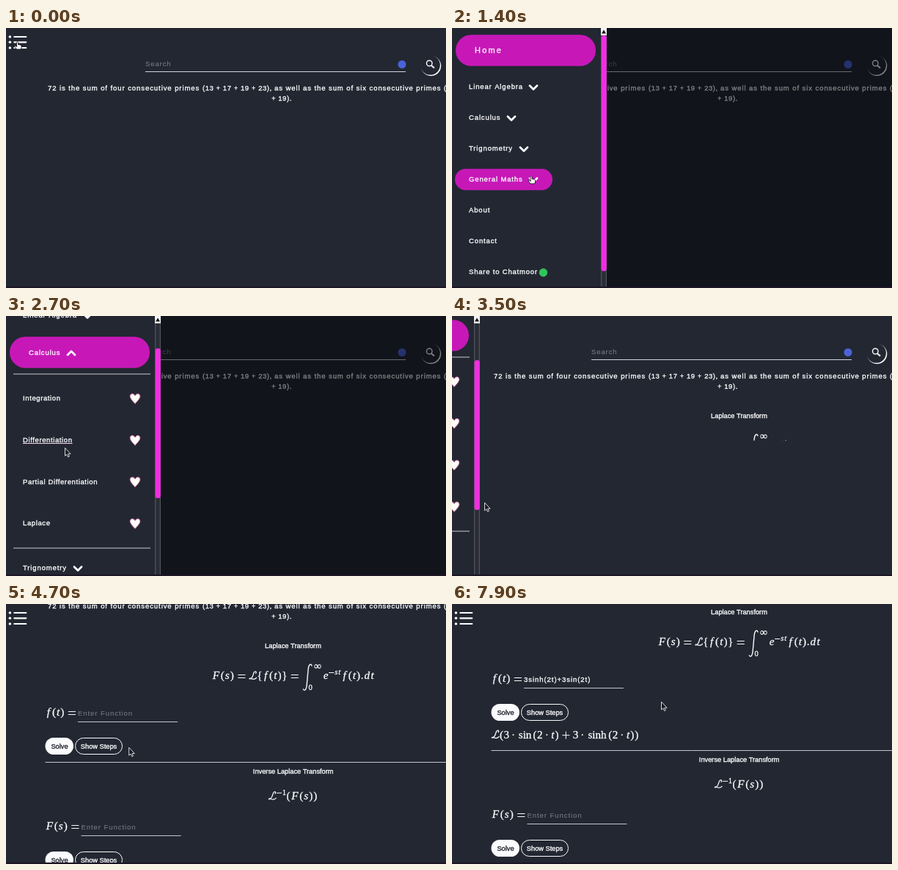
Write an HTML page with a canvas that moves like this. It is 600 px wide and 354 px high and loops after 8000 ms.

```html
<!DOCTYPE html>
<html lang="en">
<head>
<meta charset="utf-8">
<title>Maths helper</title>
<style>
html, body { margin: 0; width: 100%; height: 100%; overflow: hidden; background: #232732; }
canvas { display: block; width: 600px; height: 354px; }
</style>
</head>
<body>
<canvas id="stage" width="600" height="354"></canvas>
<script>
const g = document.getElementById('stage').getContext('2d');
const LOOP = 8000, BG = '#232732', WHITE = '#fafbfc', GREY = '#767980', RULE = '#c3c6cc';
const PINK = '#c718b7', THUMB = '#ef2fe0';
const SANS = '"Liberation Sans", Arial, sans-serif', SERIF = '"Liberation Serif", Times, serif';
const EM = 15.2, SUP = 10.6;

// Keyframes: [time, ...values]
const slideKeys = [[850, -215], [1180, 0], [3410, 0], [3485, -173], [3560, -173], [3610, -215]];
const expandKeys = [[1790, 0], [2150, 1]];
const listKeys = [[2150, 0], [2500, 49], [2750, 49], [3050, 72]];
const pageKeys = [[4050, 0], [4640, 79], [4800, 79], [5190, 125]];
const typeKeys = [[6250, 0], [6300, 1], [6470, 2], [6600, 4], [6750, 4], [7150, 18]];
const mouseKeys = [
  [860, 15.5, 18], [1330, 108, 201], [1450, 108, 201], [1700, 60, 119], [2100, 60, 119],
  [2620, 80.5, 180], [2760, 80.5, 180], [3280, 44.5, 254.5], [3600, 44.5, 254.5],
  [4250, 167.7, 195.7], [5250, 167.7, 195.7], [5950, 186, 106], [7150, 186, 106],
  [7340, 71, 142], [7560, 71, 142], [7880, 285.5, 133.5]
];
const FORMULA = '3sinh(2t)+3sin(2t)';
const SHIFT_AT = 7480, PAGE_AT = 3460, CLICK_AT = 1790;

const ease = u => u * u * (3 - 2 * u);
function key(t, keys, col = 1, fn = ease) {
  if (t <= keys[0][0]) return keys[0][col];
  for (let i = 1; i < keys.length; i++) {
    const a = keys[i - 1], b = keys[i];
    if (t <= b[0]) return a[col] + (b[col] - a[col]) * fn((t - a[0]) / (b[0] - a[0]));
  }
  return keys[keys.length - 1][col];
}

// Fill plus a hairline outline gives a medium weight
function glyphs(str, x, y, color, weight) {
  g.fillStyle = g.strokeStyle = color;
  g.lineWidth = weight;
  g.lineJoin = 'round';
  g.fillText(str, x, y);
  g.strokeText(str, x, y);
}
function text(str, x, y, { size = 9.5, gap = 0, color = WHITE, align = 'left' } = {}) {
  g.font = `${size}px ${SANS}`;
  g.letterSpacing = gap + 'px';
  g.textAlign = align;
  glyphs(str, x, y + size * 0.35, color, color === GREY ? .1 : .35);
  g.letterSpacing = '0px';
}
function line(x1, y1, x2, y2, w = 1, color = WHITE) {
  g.strokeStyle = color;
  g.lineWidth = w;
  g.beginPath();
  g.moveTo(x1, y1);
  g.lineTo(x2, y2);
  g.stroke();
}
function disc(x, y, r, color) {
  g.fillStyle = color;
  g.beginPath();
  g.arc(x, y, r, 0, Math.PI * 2);
  g.fill();
}
function pill(x, y, w, h, color, outline) {
  g.beginPath();
  g.roundRect(x, y, w, h, Math.min(w, h) / 2);
  if (outline) {
    g.strokeStyle = color;
    g.lineWidth = 1;
    g.stroke();
  } else {
    g.fillStyle = color;
    g.fill();
  }
}
function shape(d, x, y, { fill, stroke, w = 1, scale = 1 }) {
  const p = new Path2D(d);
  g.save();
  g.translate(x, y);
  g.scale(scale, scale);
  g.lineCap = g.lineJoin = 'round';
  if (fill) { g.fillStyle = fill; g.fill(p); }
  if (stroke) { g.strokeStyle = stroke; g.lineWidth = w; g.stroke(p); }
  g.restore();
}

// Advance of each math token in em
const ADV = {
  F: .782, f: .598, s: .469, t: .361, e: .466, d: .6, '(': .389, ')': .389, '{': .5, '}': .5,
  '=': 1.334, '+': 1.222, '−': .778, '·': .722, '.': .278, sin: 1.395, sinh: 1.951, 'ℒ': .69
};
const SCRIPT_L = 'M.6-.52C.7-.68.54-.76.44-.6C.34-.44.36-.1.08-.03C-.02 0 .04-.12.16-.06C.34.03.5.06.66-.12';

function math(src, x, y, em = EM) {
  const base = y + em * 0.285, axis = y + .5;
  for (const tok of src.split(' ')) {
    const adv = (ADV[tok] || 0.5) * em, mid = x + adv / 2;
    if ('=+−'.includes(tok)) {
      const half = em * 0.335;
      if (tok === '=') {
        line(mid - half, axis - 2, mid + half, axis - 2, 1);
        line(mid - half, axis + 2, mid + half, axis + 2, 1);
      } else {
        line(mid - half, axis, mid + half, axis, 1);
        if (tok === '+') line(mid, axis - half, mid, axis + half, 1);
      }
    } else if (tok === 'ℒ') {
      shape(SCRIPT_L, x, base, { stroke: WHITE, w: .085, scale: em });
    } else {
      g.font = `${/^[a-zF]$/.test(tok) ? 'italic ' : ''}${em}px ${SERIF}`;
      g.textAlign = 'center';
      glyphs(tok, mid, base, WHITE, .3);
    }
    x += adv;
  }
  return x;
}

function transform(y) {
  math('F ( s ) = ℒ { f ( t ) } =', 280.4, y);
  shape('M12-14C11-17.5 8-16 7.2-10L5.2 12C4.6 19 2 21 .3 18', 405, y, { stroke: WHITE, w: 1.4 });
  g.font = `14px ${SERIF}`;
  g.textAlign = 'center';
  glyphs('∞', 425, y - 9.5, WHITE, .3);
  math('0', 412.5, y + 16.2, SUP);
  let x = math('e', 432.5, y);
  x = math('− s t', x, y - 5, SUP);
  math('f ( t ) . d t', x + .5, y);
}
function inverse(y) {
  let x = math('ℒ', 358, y);
  x = math('− 1', x, y - 5, SUP);
  math('( F ( s ) )', x, y);
}

function field(label, x, y, value) {
  math(label, 53.4, y);
  text(value || 'Enter Function', x, y + 1, { gap: .95, color: value ? WHITE : GREY });
  line(x, y + 12.5, x + 136, y + 12.5, 1, RULE);
}
function buttons(y) {
  pill(53.5, y - 11.5, 38.5, 23, WHITE);
  text('Solve', 73, y + .3, { size: 9.25, color: '#20232c', align: 'center' });
  pill(94.5, y - 11, 64, 22, WHITE, true);
  text('Show Steps', 126.5, y + .3, { size: 9.25, align: 'center' });
}

function header() {
  text('Search', 190, 49, { gap: .9, color: GREY });
  line(190, 59.5, 545, 59.5, 1, '#cfd6e2');
  disc(540, 49.5, 5.5, '#4a63d8');
  disc(579.6, 51.6, 13.7, WHITE);
  disc(578.6, 50.5, 13.3, BG);
  g.strokeStyle = WHITE;
  g.lineWidth = 1.4;
  g.beginPath();
  g.arc(577.3, 48, 3.8, 0, 7);
  g.stroke();
  line(580, 51, 584, 54.6, 2);
  text('72 is the sum of four consecutive primes', 57, 82, { gap: .93 });
  text('(13 + 17 + 19 + 23),', 268, 82, { gap: .55 });
  text('as well as the sum of six consecutive primes (5 + 7', 366, 82, { gap: .92 });
  text('+ 19).', 362, 95.5, { gap: .55 });
}

function lesson(t) {
  text('Laplace Transform', 391.5, 135.3, { size: 9.25, align: 'center' });
  g.save();
  if (t < 3570) {
    g.beginPath();
    g.rect(0, 0, 600, 169.5);
    g.clip();
  }
  transform(177);
  const typed = FORMULA.slice(0, Math.floor(key(t, typeKeys, 1, u => u) + 1e-6));
  field('f ( t ) =', 98, 227, typed);
  buttons(272.5);
  const solved = t >= SHIFT_AT;
  if (solved) math('ℒ ( 3 · sin ( 2 · t ) + 3 · sinh ( 2 · t ) )', 54, 303.2);
  g.translate(0, solved ? 30 : 0);
  line(53.5, 294.5, 600, 294.5, 1, RULE);
  text('Inverse Laplace Transform', 391.7, 306.8, { size: 9.25, align: 'center' });
  inverse(340.8);
  field('F ( s ) =', 102.5, 382, '');
  buttons(427.5);
  g.restore();
}

function burger() {
  g.lineCap = 'round';
  for (const y of [12, 19.3, 27]) {
    disc(5.4, y, 1.8, WHITE);
    line(11.3, y, 27.3, y, 2.2);
  }
  g.lineCap = 'butt';
}

const chevron = (x, y, up) => shape(up ? 'M-5 2.6L0-2.4L5 2.6' : 'M-5-2.6L0 2.4L5-2.6', x, y, { stroke: WHITE, w: 2.8 });
const HEART = 'M0 7C-3 4-7-.2-7-3.2C-7-7.4-1.8-8 0-4C1.8-8 7-7.4 7-3.2C7-.2 3 4 0 7Z';
const SUBS = ['Integration', 'Differentiation', 'Partial Differentiation', 'Laplace'];
// Label, arrow position, hover width
const ITEMS = [
  ['Linear Algebra', 111, 133], ['Calculus', 81, 103], ['Trignometry', 98, 120], ['General Maths', 111, 133],
  ['About', 0, 70], ['Contact', 0, 80], ['Share to Chatmoor', 0, 138]
];

function subList(top, open, m) {
  g.save();
  g.beginPath();
  g.rect(0, top + 23, 203, 251 * open);
  g.clip();
  line(10, top + 29.5, 197, top + 29.5, 1, '#c9cbd1');
  SUBS.forEach((name, i) => {
    const y = top + 62.5 + i * 56.7;
    text(name, 23, y, { gap: .61 });
    if (m.x > 20 && m.x < 130 && Math.abs(m.y - y) < 14) {
      line(23, y + 4.8, 23 + g.measureText(name).width + name.length * .61, y + 4.8, 1, '#f3d6ee');
    }
    shape(HEART, 176, y + .5, { fill: '#fffdf8', stroke: '#a8487c', w: .9 });
  });
  line(10, top + 266.5, 197, top + 266.5, 1, '#c9cbd1');
  g.restore();
}

function sidebar(t, m) {
  const open = key(t, expandKeys), roll = key(t, listKeys), onCalc = t >= CLICK_AT;
  g.fillStyle = BG;
  g.fillRect(0, 0, 211, 354);
  const homeY = 30.5 - 16 * open - roll;
  if (!onCalc) pill(5, homeY - 21.3, 191, 42.6, PINK);
  text('Home', 31 - 8 * open, homeY, { size: 11, gap: 2.2 });
  let y = 80 - 32 * open - roll;
  ITEMS.forEach(([name, arrow, wide], i) => {
    const active = i === 1 && onCalc;
    if (i === 1) y += 8.5 * open;
    const hover = t < 3400 && m.x < 4 + wide && Math.abs(m.y - y) < 14.5;
    const dx = active ? 8 : 0;
    if (active) pill(5, y - 21.3, 191, 42.6, PINK);
    else if (hover) pill(4, y - 14.3, wide, 29, PINK);
    text(name, 23 + dx, y, { gap: i === 6 ? .8 : .87 });
    if (arrow) chevron(arrow + dx, y + 1, active);
    if (i === 6) disc(124.5, y + 1, 5.7, '#31c45a');
    if (active && open > 0) subList(y, open, m);
    y += 42 + (i === 1 ? 251.5 * open : 0);
  });
  g.fillStyle = '#2b2d36';
  g.fillRect(203, 0, 8, 354);
  line(203.7, 10, 203.7, 354, 1, '#5a5c64');
  line(210.3, 10, 210.3, 354, 1, '#5a5c64');
  g.fillStyle = '#f4f4f4';
  g.fillRect(203, 0, 8, 10);
  shape('M0 0L3 5H-3Z', 207, 2.5, { fill: '#111' });
  pill(203.6, 10 + .695 * roll, 7.2, 321 - 117 * open, THUMB);
}

const ARROW = 'M0 0V10.4L2.4 8.4L4.1 12L5.8 11.2L4.2 7.8H7.2Z';
const HAND = 'M-1 1.4Q0-.6 1 1.4V4.4L4.6 5.2Q6 5.6 5.6 8L5 11H-1L-3.8 7.2Q-4.2 5.6-2.6 6.2L-1 7.4Z';
const BEAM = 'M-2.2-4.6Q0-4.6 0-3.4Q0-4.6 2.2-4.6M0-3.4V3.4M-2.2 4.6Q0 4.6 0 3.4Q0 4.6 2.2 4.6';

function cursor(t, m) {
  if (t > 6220 && t < 7150) return;
  const hand = t < 900 || (t > 1180 && t < 2250) || (t > 3150 && t < 3440) || (t > 7300 && t < 7610);
  if (hand) shape(HAND, m.x, m.y, { fill: '#fff', stroke: '#15171d', w: .9 });
  else if (t > 5850 && t < 7200) shape(BEAM, m.x, m.y, { stroke: WHITE, w: 1.1 });
  else shape(ARROW, m.x, m.y, { fill: '#171a22', stroke: '#e8eaee', w: .9 });
}

function draw(t) {
  const m = { x: key(t, mouseKeys), y: key(t, mouseKeys, 2) };
  const slide = key(t, slideKeys);
  g.fillStyle = BG;
  g.fillRect(0, 0, 600, 354);
  g.save();
  g.translate(0, -key(t, pageKeys));
  header();
  if (t >= PAGE_AT) lesson(t);
  g.restore();
  burger();
  if (t > 850 && t < PAGE_AT) {
    g.fillStyle = `rgba(0,2,5,${.5 * Math.min(1, (t - 850) / 250)})`;
    g.fillRect(0, 0, 600, 354);
  }
  if (slide > -212) {
    g.save();
    g.translate(slide, 0);
    sidebar(t, m);
    g.restore();
  }
  g.fillStyle = '#1d1526';
  g.fillRect(0, 352, 600, 2);
  cursor(t, m);
}

const start = performance.now();
function tick() {
  draw((performance.now() - start) % LOOP);
  requestAnimationFrame(tick);
}
tick();
</script>
</body>
</html>
```
